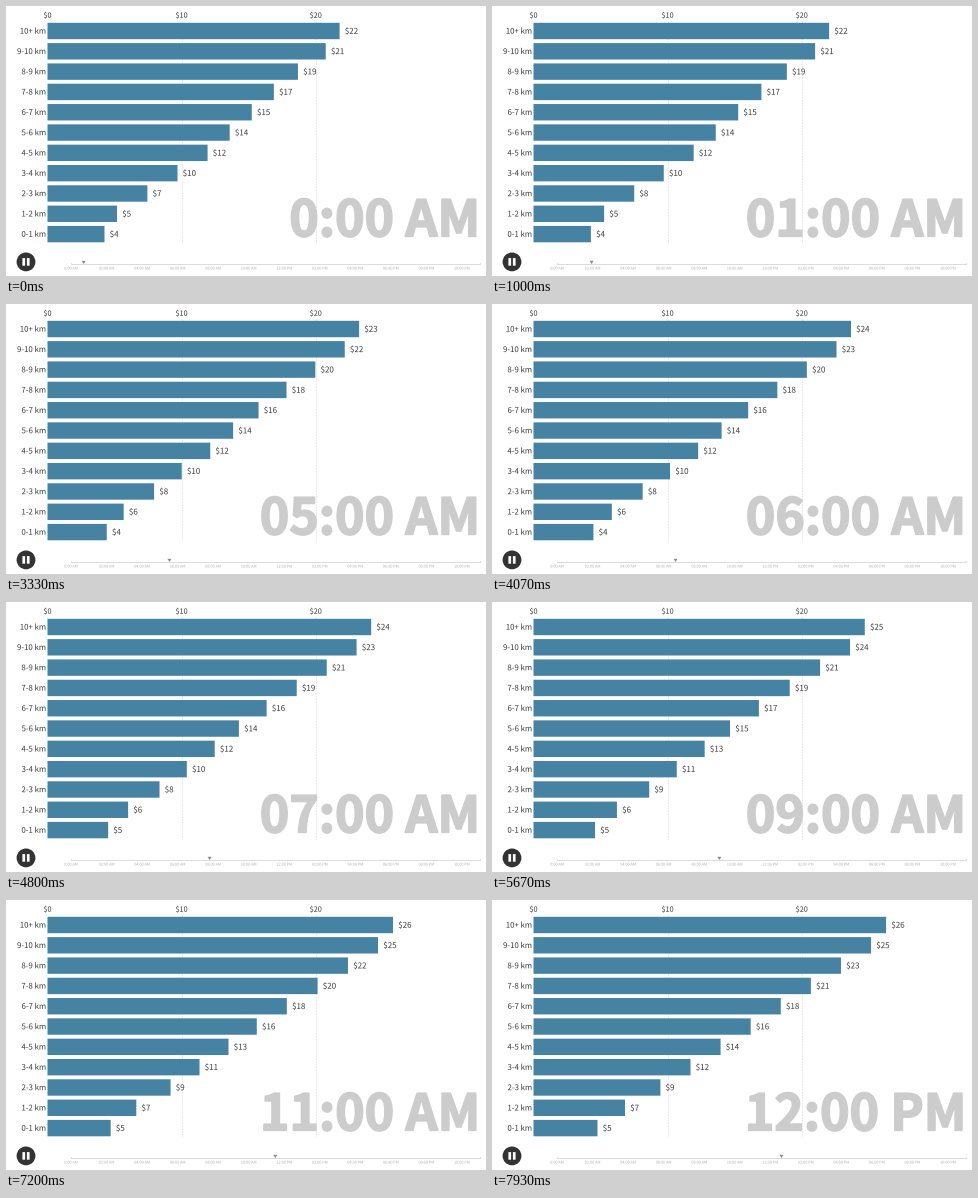
Write a matplotlib script that moves like this. It is 480 px wide and 270 px high and loops after 8000 ms.

```python
import numpy as np
import matplotlib.pyplot as plt
from matplotlib.animation import FuncAnimation
from matplotlib.patches import Circle, Polygon, Rectangle
from matplotlib.patheffects import Normal, withStroke

W, H, DPI = 480, 270, 80
FRAMES, INTERVAL = 160, 50
LAST_STEP = 116
PT = 72 / DPI

X0, PX_PER_DOLLAR = 41.5, 13.41
ROW_TOP, ROW_STEP, BAR_H = 25.0, 20.31, 16.4
HOUR_X0, HOUR_W = 65, 17.77
MARKER_X0, MARKER_STEP = 77.7, 1.825

BAR, TEXT, GRID, BUTTON = "#4682a2", "#3c3c3c", "#dedede", "#333333"
CLOCK, AXIS = "#cccccc", "#cecece"

plt.rcParams["font.family"] = "Noto Sans CJK JP"

fig = plt.figure(figsize=(W / DPI, H / DPI), dpi=DPI, facecolor="white")
ax = fig.add_axes([0, 0, 1, 1])
ax.set(xlim=(0, W), ylim=(H, 0))
ax.axis("off")


def label(x, y, text, size, color=TEXT, **kw):
    # A path effect makes the text draw as outlines at sub-pixel positions.
    kw.setdefault("path_effects", [Normal()])
    return ax.text(x, y, text, fontsize=size * PT, color=color,
                   va="baseline", **kw)


def rect(x, y, w, h, color, **kw):
    return ax.add_patch(Rectangle((x, y), w, h, fc=color, ec="none",
                                  snap=False, **kw))


def clock_text(hour):
    if hour == 0:
        return "0:00 AM"
    return f"{hour if hour <= 12 else hour - 12:02d}:00 {'AM' if hour < 12 else 'PM'}"


def bar_length(km, step):
    """Fares rise with distance; mid-range trips start growing later."""
    km = min(km, 9.5)
    final = np.interp(km, [0, 1, 2, 9.5], [64, 91.5, 126.9, 352.6])
    growth = np.interp(km, [0, 1, 2, 4, 7, 8, 9.5], [7, 22, 27, 27, 51, 57, 60.5])
    power = 1.25 + 1.4 * np.exp(-((km - 4.5) / 2) ** 2)
    return final - growth * (1 - (step / LAST_STEP) ** power)


# Value axis
for dollars in (0, 10, 20):
    x = X0 + dollars * PX_PER_DOLLAR
    label(x, 11.8, f"${dollars}", 7.3, ha="center")
    if dollars:
        ax.plot([x, x], [15, 237], color=GRID, lw=0.8 * PT,
                dashes=(2, 1.5), zorder=0.5)

# Bars with their names and values, longest trips on top
rows = []
for km in range(11):
    y = ROW_TOP + (10 - km) * ROW_STEP
    label(40.3, y + 2.7, f"{km}-{km + 1} km" if km < 10 else "10+ km", 7.8,
          ha="right")
    bar = rect(X0, y - BAR_H / 2, 1, BAR_H, BAR, zorder=2)
    rows.append((km, bar, label(0, y + 2.8, "", 8, ha="left")))

clock = label(474.3, 230.3, "", 50, CLOCK, ha="right", weight="bold", zorder=1,
              path_effects=[withStroke(linewidth=1.7 * PT, foreground=CLOCK)])

# Timeline and pause button
end_x = HOUR_X0 + 23 * HOUR_W
ax.plot([HOUR_X0, HOUR_X0, end_x, end_x], [256.7, 258.2, 258.2, 256.7],
        color=AXIS, lw=0.7 * PT)
for hour in range(0, 24, 2):
    label(HOUR_X0 + hour * HOUR_W, 263.6, clock_text(hour), 3.8, "#b0b0b0",
          ha="center")
marker = ax.add_patch(Polygon(np.zeros((3, 2)), fc="#8a8a8a", ec="none"))
ax.add_patch(Circle((20, 255.9), 9.4, fc=BUTTON, ec="none"))
for x in (16.4, 20.9):
    rect(x, 252.1, 2.7, 7.6, "white", zorder=2)


def update(frame):
    # Playback runs at 15 steps a second and stalls three times at the start.
    tick = int(frame * INTERVAL * 0.015 + 0.5)
    step = tick - sum(tick >= stall for stall in (1, 3, 6))

    for km, bar, value in rows:
        length = bar_length(km, step)
        bar.set_width(length)
        value.set_x(X0 + length + 5.2)
        value.set_text(f"${length / PX_PER_DOLLAR:.0f}")

    x = MARKER_X0 + MARKER_STEP * step
    marker.set_xy([(x - 2, 254.8), (x + 2, 254.8), (x, 258)])
    clock.set_text(clock_text(int((x - HOUR_X0) / HOUR_W)))


anim = FuncAnimation(fig, update, frames=FRAMES, init_func=lambda: update(0),
                     interval=INTERVAL, repeat=True, repeat_delay=0)
plt.show()
```
